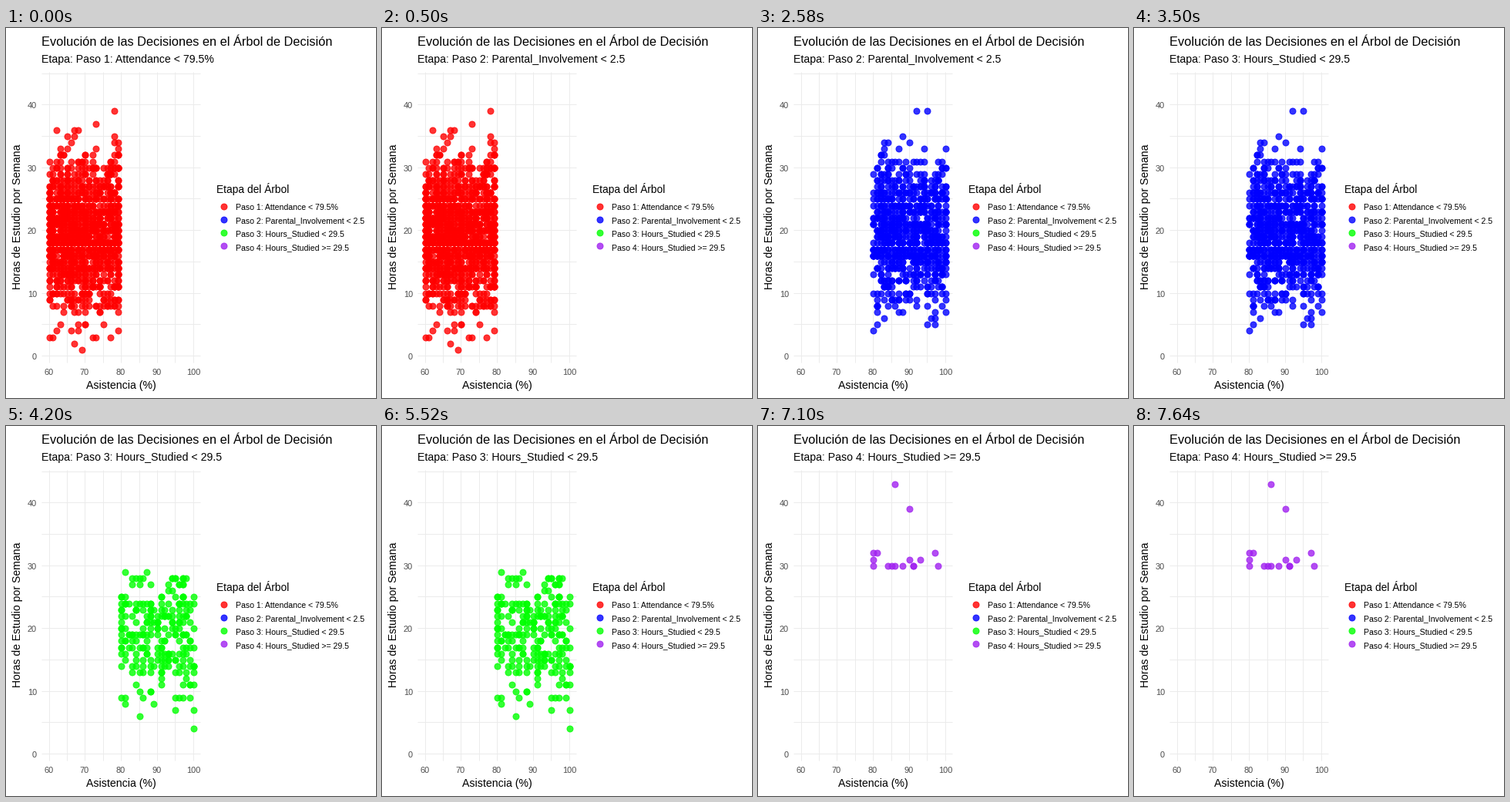
Animation of 480 by 480 pixels, one loop 8 s. Source, as a matplotlib script:

```python
import numpy as np
import matplotlib.pyplot as plt
from matplotlib.animation import FuncAnimation
from matplotlib.markers import MarkerStyle
from matplotlib.transforms import Affine2D

plt.rcParams["font.family"] = "Liberation Sans"

SIZE, DPI, STEP, LOOP = 480, 72, 100, 8000
LEFT, RIGHT, TOP, BOTTOM = 46, 252, 57, 434
DOT = 8
# Centre each dot on the middle of a pixel
ROUND = MarkerStyle("o", transform=Affine2D().translate(0.5 / DOT, -0.5 / DOT))

STAGES = [
    ("Paso 1: Attendance < 79.5%", "#ff0000"),
    ("Paso 2: Parental_Involvement < 2.5", "#0000ff"),
    ("Paso 3: Hours_Studied < 29.5", "#00ff00"),
    ("Paso 4: Hours_Studied >= 29.5", "#a020f0"),
]
TITLE_TIMES = [500, 3500, 6400]
POINT_TIMES = [1200, 4200, 7100]


def px(x):
    return np.floor(56.2 + (np.asarray(x) - 60) * 4.675)


def py(y):
    return np.floor(425.55 - np.asarray(y) * 8.145)


def cloud(seed, xs, ys, peak):
    """Students per (attendance, hours) cell, bell-shaped in hours."""
    rng = np.random.default_rng(seed)
    x, y = (g.ravel() for g in np.meshgrid(xs, ys))
    count = rng.poisson(peak * np.exp(-((y - 19.8) / 6) ** 2 / 2))
    return list(zip(np.repeat(x, count), np.repeat(y, count)))


low, high = np.arange(60, 80), np.arange(80, 101)
GROUPS = [
    cloud(4, low, np.arange(3, 37), 3.6) + [(78, 39), (73, 37), (67, 2), (69, 1)],
    cloud(7, high, np.arange(5, 36), 2.5) + [(92, 39), (95, 39), (80, 4)],
    cloud(3, high, np.arange(7, 30), 0.85) + [(85, 6), (100, 4)],
    [(x, 30) for x in (80, 84, 85, 86, 88, 91, 91, 98)]
    + [(80, 31), (90, 31), (93, 31), (80, 32), (81, 32), (97, 32),
       (90, 39), (86, 43)],
]

fig = plt.figure(figsize=(SIZE / DPI, SIZE / DPI), dpi=DPI, facecolor="white")
ax = fig.add_axes([0, 0, 1, 1])
ax.set(xlim=(0, SIZE), ylim=(SIZE, 0))
ax.axis("off")


def label(x, y, text, size, color="black", **kw):
    return ax.text(x, y, text, fontsize=size, color=color, va="baseline", **kw)


def dots(x, y, color):
    return ax.plot(x, y, ls="", marker=ROUND, ms=DOT, mew=1, color=color,
                   alpha=0.8, antialiased=False)[0]


def grid():
    style = dict(color="#ebebeb", lw=1, zorder=0, solid_capstyle="butt")
    for x in range(60, 101, 5):
        ax.plot([px(x)] * 2, [TOP, BOTTOM], **style)
    for y in range(0, 46, 5):
        ax.plot([LEFT, RIGHT], [py(y)] * 2, **style)
    for x in range(60, 101, 10):
        label(px(x), 450, str(x), 11, "#4d4d4d", ha="center")
    for y in range(0, 41, 10):
        label(40, py(y) + 5, str(y), 11, "#4d4d4d", ha="right")


def legend():
    label(273, 214, "Etapa del Árbol", 13.8)
    for i, (name, color) in enumerate(STAGES):
        y = 231 + 17.28 * i
        dots([282], [np.floor(y)], color)
        label(298, y + 5, name, 10.5)


grid()
legend()
label(46, 23, "Evolución de las Decisiones en el Árbol de Decisión", 16.35)
label(149, 468, "Asistencia (%)", 14.1, ha="center")
label(19, 244.5, "Horas de Estudio por Semana", 14, rotation=90,
      ha="center", rotation_mode="anchor")
subtitle = label(46, 45, "", 14.1)

layers = []
for points, (_, color) in zip(GROUPS, STAGES):
    xs, ys = zip(*points)
    layers.append(dots(px(xs), py(ys), color))


def stage_at(t, times):
    return sum(t >= limit for limit in times)


def update(i):
    t = i * STEP
    subtitle.set_text("Etapa: " + STAGES[stage_at(t, TITLE_TIMES)][0])
    shown = stage_at(t, POINT_TIMES)
    for k, layer in enumerate(layers):
        layer.set_visible(k == shown)
    return [subtitle, *layers]


anim = FuncAnimation(fig, update, frames=LOOP // STEP, interval=STEP,
                     repeat=True, repeat_delay=0, blit=False)
plt.show()
```
